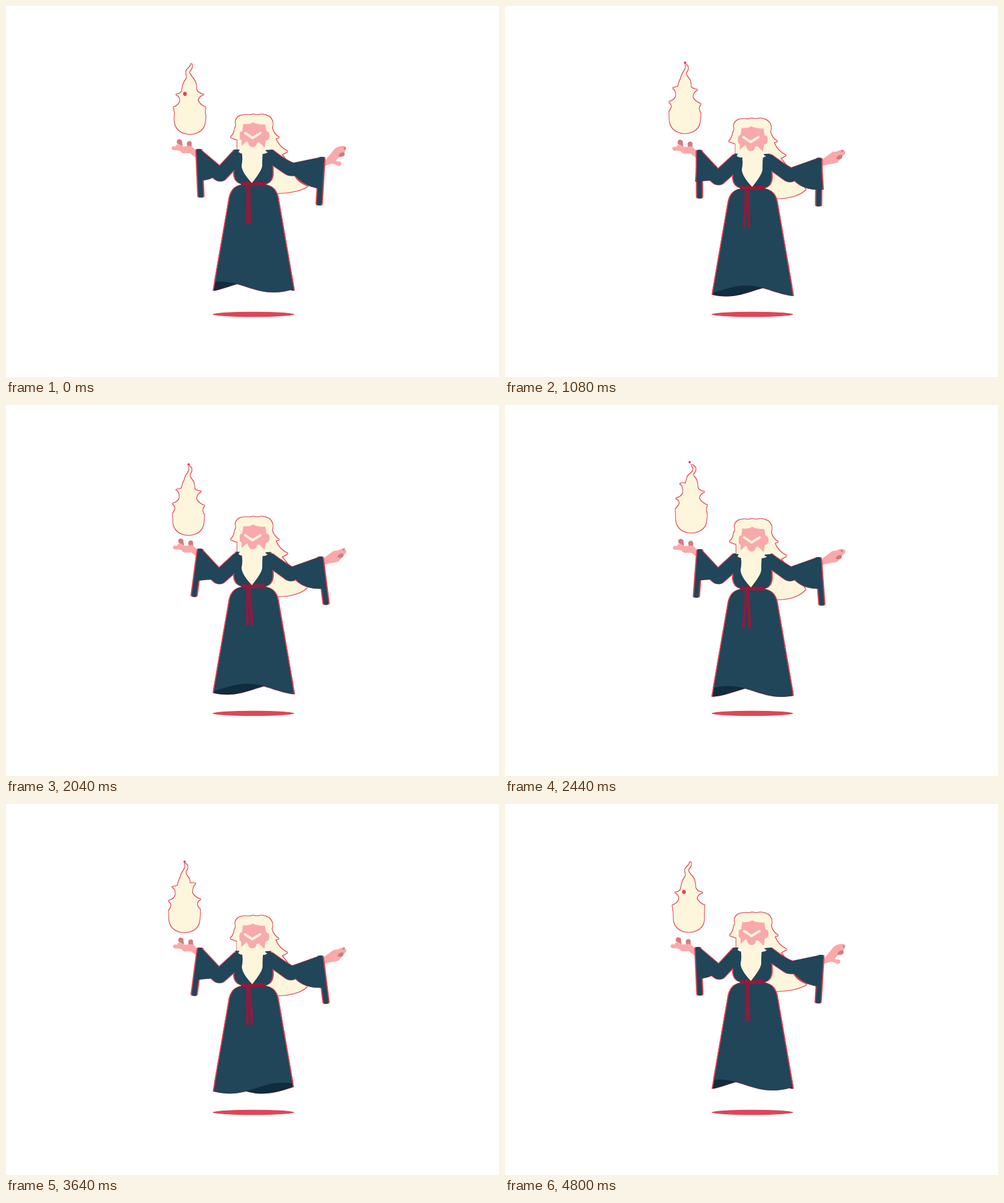
Recreate the animation shown at these times as an HTML page without scripts. Size 810 by 610 pixels, loop 4.84 s.

```html
<!DOCTYPE html>
<html lang="en">
<head>
<meta charset="utf-8">
<title>Floating wizard</title>
<style>
  html, body { margin: 0; width: 100%; height: 100%; overflow: hidden; background: #fff; }
  svg { display: block; width: 810px; height: 610px; }
  .cream { fill: #fef6dc; }
  .robe { fill: #214559; }
  .lining { fill: #102c3d; }
  .skin { fill: #faa9aa; }
  .shade { fill: #d27c7e; }
  .red { fill: #de4656; }
  .belt { fill: #96193b; }
  .brow { fill: none; stroke: #fef6dc; stroke-width: 4; stroke-linecap: round; stroke-linejoin: round; }
  .tie { stroke: #861f3f; stroke-width: 5; }
</style>
</head>
<body>
<svg viewBox="0 0 810 610">
  <!-- Master clock: every cycle restarts with it. -->
  <animate id="loop" attributeName="visibility" values="visible" begin="0s;loop.end" dur="4.84s"/>
  <defs>
    <filter id="rim" filterUnits="userSpaceOnUse" x="-60" y="-150" width="870" height="760" color-interpolation-filters="sRGB">
      <feMorphology in="SourceAlpha" operator="dilate" radius="1" result="grown"/>
      <feFlood flood-color="#de4656"/>
      <feComposite in2="grown" operator="in"/>
      <feMerge><feMergeNode/><feMergeNode in="SourceGraphic"/></feMerge>
    </filter>
    <!-- Sideways only, so the hem stays clean. -->
    <filter id="sideRim" filterUnits="userSpaceOnUse" x="0" y="0" width="810" height="610" color-interpolation-filters="sRGB">
      <feMorphology in="SourceAlpha" operator="dilate" radius="2 0" result="grown"/>
      <feFlood flood-color="#de4656"/>
      <feComposite in2="grown" operator="in"/>
      <feMerge><feMergeNode/><feMergeNode in="SourceGraphic"/></feMerge>
    </filter>
    <clipPath id="skirt">
      <path d="M387 294Q372 297 368 314L340.5 473H473.500L446 314Q442 297 427 294Z"/>
    </clipPath>
    <!-- Hem: three sine waves, 175 wide. -->
    <path id="wave" d="M2 453c32 0 55.5 18 87.5 18s55.5-18 87.5-18s55.5 18 87.5 18s55.5-18 87.5-18s55.5 18 87.5 18s55.5-18 87.5-18V280H2Z"/>
  </defs>

  <ellipse class="red" cx="406.5" cy="507" rx="67" ry="4.2"/>

  <!-- Hair -->
  <g filter="url(#rim)">
    <g class="cream">
      <animateTransform attributeName="transform" type="translate" values="0 0;0 9;0 0" begin="0s;loop.end" dur="1.6s" repeatCount="3" fill="freeze" calcMode="spline" keyTimes="0;.5;1" keySplines=".37 0 .63 1;.37 0 .63 1"/>
      <path>
        <animate attributeName="d" values="M425 225L452 243L495 297Q478 307 444 308L425 290Z;M425 225L452 243L494 294Q478 312 443 311L425 290Z;M425 225L452 243L495 297Q478 307 444 308L425 290Z" begin="0s;loop.end" dur="1.6s" repeatCount="3" fill="freeze"/>
      </path>
      <path d="M377 190Q380 178 396 179Q402 180 406 178Q412 180 420 178Q434 179 438 190Q439 196 437 200Q440 212 449 216L443 218Q449 233 463 239L452 245H380V220L369 216Q375 211 376 201Q379 198 377 190Z">
        <animateTransform attributeName="transform" type="translate" values="0 0;-2.5 0;0 0;0 0;-1 0;0 0" keyTimes="0;.117;.342;.658;.858;1" begin="0s;loop.end" dur="4.8s" fill="freeze"/>
      </path>
    </g>
  </g>

  <!-- Left hand -->
  <g>
    <animateTransform attributeName="transform" type="translate" values="0 0;4 1;0 0" begin="0s;loop.end" dur="1.6s" repeatCount="3" fill="freeze" calcMode="spline" keyTimes="0;.5;1" keySplines=".37 0 .63 1;.37 0 .63 1"/>
    <path class="shade" d="M284 233L286 228Q279 227 281 221Q284 217 289 221L290 231ZM298 231Q295 223 301 222Q306 222 305 228L306 235Z"/>
    <path class="skin" d="M318 250L313 238L304 230L291 231L286 228Q279 226 279 231Q272 229 272 234Q273 238 279 237L286 238Q289 243 294 242H302L313 250Z"/>
  </g>

  <!-- Right hand -->
  <path class="skin">
    <animate attributeName="d" values="M520 264L526 252L539 236Q545 229 557 230L559 235Q556 241 553 247Q545 248 542 255L550 256Q553 262 547 263L536 259Z;M516 264L523 251L538 240L546 239Q552 234 559 239L559 243Q555 246 552 250Q551 253 548 255L547 257Q543 259 540 259L534 260Z;M520 264L526 252L539 236Q545 229 557 230L559 235Q556 241 553 247Q545 248 542 255L550 256Q553 262 547 263L536 259Z" begin="0s;loop.end" dur="1.6s" repeatCount="3" fill="freeze" calcMode="spline" keyTimes="0;.5;1" keySplines=".37 0 .63 1;.37 0 .63 1"/>
  </path>
  <path class="shade" d="M546 247Q549 239 556 241Q558 247 551 248ZM554 233L559 232L557 237Z">
    <animateTransform attributeName="transform" type="translate" values="0 0;-3 6;0 0" begin="0s;loop.end" dur="1.6s" repeatCount="3" fill="freeze" calcMode="spline" keyTimes="0;.5;1" keySplines=".37 0 .63 1;.37 0 .63 1"/>
  </path>

  <path class="red" d="M472 276Q478 291 497 297L498 285Z">
    <animate attributeName="opacity" values="1;0;1" keyTimes="0;.02;.9" calcMode="discrete" begin="0s;loop.end" dur="1.6s" repeatCount="3" fill="freeze"/>
  </path>

  <!-- Robe -->
  <g class="robe" filter="url(#sideRim)">
    <path>
      <animate attributeName="d" values="M384 236H376L351 263L319 236L314 240L323 287Q332 286 340 282Q352 294 361 284L378 266Z;M384 245L376 244L350 268L322 238L317 242L314 289Q330 287 338 287Q350 301 361 289L378 274Z;M384 236H376L351 263L319 236L314 240L323 287Q332 286 340 282Q352 294 361 284L378 266Z" begin="0s;loop.end" dur="1.6s" repeatCount="3" fill="freeze" calcMode="spline" keyTimes="0;.5;1" keySplines=".37 0 .63 1;.37 0 .63 1"/>
    </path>
    <path>
      <animate attributeName="d" values="M428 236H437Q460 254 472 258L521 248L523 253L514 300Q490 296 475 279Q466 281 459 276L434 259Z;M428 245L437 244Q460 261 470 266L515 250L519 254L522 302Q492 304 476 287Q468 293 459 286L434 268Z;M428 236H437Q460 254 472 258L521 248L523 253L514 300Q490 296 475 279Q466 281 459 276L434 259Z" begin="0s;loop.end" dur="1.6s" repeatCount="3" fill="freeze" calcMode="spline" keyTimes="0;.5;1" keySplines=".37 0 .63 1;.37 0 .63 1"/>
    </path>

    <!-- Cuffs -->
    <g>
      <animateTransform attributeName="transform" type="translate" values="317 239;320 241;317 239" begin="0s;loop.end" dur="1.6s" repeatCount="3" fill="freeze" calcMode="spline" keyTimes="0;.5;1" keySplines=".37 0 .63 1;.37 0 .63 1"/>
      <rect x="-4" y="-4" width="8" height="80" rx="3">
        <animateTransform attributeName="transform" type="rotate" values="-2.5;3;9.5;3.7;-4.5;-2.5" keyTimes="0;.15;.33;.55;.8;1" begin="0s;loop.end" dur="1.6s" repeatCount="3" fill="freeze"/>
      </rect>
    </g>
    <g>
      <animateTransform attributeName="transform" type="translate" values="519 252;515 254;519 252" begin="0s;loop.end" dur="1.6s" repeatCount="3" fill="freeze" calcMode="spline" keyTimes="0;.5;1" keySplines=".37 0 .63 1;.37 0 .63 1"/>
      <rect x="-4" y="-4" width="8" height="80" rx="3">
        <animateTransform attributeName="transform" type="rotate" values="3.5;-3;-9;-3.7;5;3.5" keyTimes="0;.15;.33;.55;.8;1" begin="0s;loop.end" dur="1.6s" repeatCount="3" fill="freeze"/>
      </rect>
    </g>

    <!-- Torso and skirt -->
    <g>
      <animateTransform attributeName="transform" type="translate" values="0 0;0 9;0 0" begin="0s;loop.end" dur="1.6s" repeatCount="3" fill="freeze" calcMode="spline" keyTimes="0;.5;1" keySplines=".37 0 .63 1;.37 0 .63 1"/>
      <path d="M378 236H434Q438 250 438 276Q437 290 426 293H388Q376 290 375 276Q375 255 378 236Z"/>
      <g clip-path="url(#skirt)">
        <g>
          <animateTransform attributeName="transform" type="translate" values="0 0;175 0" begin="0s;loop.end" dur=".48s" repeatCount="10" fill="freeze"/>
          <use href="#wave" x="55" class="lining"/>
          <use href="#wave"/>
        </g>
      </g>
    </g>
  </g>

  <!-- Belt, beard and face -->
  <g>
    <animateTransform attributeName="transform" type="translate" values="0 0;0 9;0 0" begin="0s;loop.end" dur="1.6s" repeatCount="3" fill="freeze" calcMode="spline" keyTimes="0;.5;1" keySplines=".37 0 .63 1;.37 0 .63 1"/>
    <line class="tie" x1="397" y1="293" y2="358">
      <animate attributeName="x2" values="396.5;396;391.5;394;396.5" keyTimes="0;.35;.55;.8;1" begin="0s;loop.end" dur="1.6s" repeatCount="3" fill="freeze"/>
    </line>
    <line class="tie" x1="399" y1="293" y2="358">
      <animate attributeName="x2" values="400.5;406;401.5;400;400.5" keyTimes="0;.35;.55;.8;1" begin="0s;loop.end" dur="1.6s" repeatCount="3" fill="freeze"/>
    </line>
    <rect class="belt" x="386" y="289.5" width="41" height="6.5" rx="1"/>
    <path class="cream" d="M386 232H423Q421 243 421 262Q421 270 404 291Q387 273 387 262Q390 250 386 232Z">
      <animateTransform attributeName="transform" type="translate" values="0 0;4 0;0 0;0 0;1 0;0 0" keyTimes="0;.117;.342;.658;.858;1" begin="0s;loop.end" dur="4.8s" fill="freeze"/>
    </path>
    <g>
      <animateTransform attributeName="transform" type="translate" values="0 0;-2.5 0;0 0;0 0;-1 0;0 0" keyTimes="0;.117;.342;.658;.858;1" begin="0s;loop.end" dur="4.8s" fill="freeze"/>
      <path class="cream" d="M380 215H437V236L426 237Q428 241 431 240Q424 245 418 242H392Q387 244 382 240L384 236H380Z"/>
      <path class="skin" d="M390 194Q401 195 406 191Q412 195 426 195L428 206Q433 206 433 213Q433 221 427 221L425 233L416 224L412 225Q412 232 405 232Q399 232 398 225L396 222L387 230V221Q383 219 384 212Q384 205 388 206Z"/>
      <path class="brow" d="M393 209L405 217L418 209"/>
    </g>
  </g>

  <!-- Flame: left side, right side and tail cycle at their own pace. -->
  <g>
    <animateTransform attributeName="transform" type="translate" values="302 0;301 0;296 0;293 0;295 0;299 0;306 0;301 0;296 0;293 0;293 0;301 0;302 0" keyTimes="0;.117;.208;.292;.342;.417;.508;.583;.658;.708;.771;.858;1" begin="0s;loop.end" dur="4.8s" fill="freeze"/>
    <g>
      <animateTransform attributeName="transform" type="translate" values="0 210.5;0 206.5;0 210.5;0 214.5;0 210.5" calcMode="spline" keyTimes="0;.25;.5;.75;1" keySplines=".36 .55 .64 1;.36 0 .64 .45;.36 .55 .64 1;.36 0 .64 .45" begin="0s;loop.end" dur="2.4s" repeatCount="2" fill="freeze"/>
      <g class="cream" filter="url(#rim)">
        <path>
          <animate attributeName="d" values="M1 0C-14 0 -23 -8 -25 -20Q-26 -26 -25 -30Q-25 -33 -25 -36Q-25 -40 -27 -44Q-17 -47 -16 -55Q-16 -63 -23 -65Q-13 -66 -13 -72Q-12 -80 -9 -86Q-6 -90 -5 -92L1 -92Z;M1 0C-14 0 -23 -8 -25 -20Q-25 -34 -26 -41Q-20 -45 -18 -51Q-18 -57 -25 -59Q-14 -62 -13 -68Q-12 -82 -18 -84Q-10 -86 -9 -82Q-8 -85 -7 -88Q-6 -90 -5 -92L1 -92Z;M1 0C-14 0 -23 -8 -25 -20Q-25 -36 -27 -44Q-17 -47 -16 -55Q-16 -63 -23 -65Q-13 -66 -13 -72Q-12 -80 -9 -86Q-8 -88 -7 -89Q-6 -90 -6 -91Q-5 -92 -5 -92L1 -92Z" keyTimes="0;.75;1" begin="0s;loop.end" dur=".32s" repeatCount="15" fill="freeze"/>
        </path>
        <path>
          <animate attributeName="d" values="M-1 0C14 0 24 -8 25 -20Q26 -26 26 -30Q25 -33 25 -36Q25 -40 26 -44Q17 -47 13 -55Q14 -63 23 -65Q12 -67 11 -73Q11 -80 9 -86Q7 -89 5 -92L-1 -92Z;M-1 0C14 0 24 -8 25 -20Q26 -28 26 -37Q22 -41 21 -45Q21 -52 27 -54Q15 -58 13 -65Q13 -77 19 -80Q10 -82 9 -80Q9 -85 8 -88Q6 -90 5 -92L-1 -92Z;M-1 0C14 0 24 -8 25 -20Q25 -36 26 -44Q17 -47 13 -55Q14 -63 23 -65Q12 -67 11 -73Q11 -80 9 -86Q8 -88 7 -89Q6 -90 6 -91Q5 -92 5 -92L-1 -92Z" keyTimes="0;.58;1" begin="0s;loop.end" dur=".48s" repeatCount="10" fill="freeze"/>
        </path>
        <path>
          <animate attributeName="d" values="M-7 -87C-2 -97 -9 -100 -5 -105C-2 -109 1 -110 2 -116C6 -111 3 -108 0 -104C-3 -100 2 -97 8 -87Z;M-7 -87C-8 -95 0 -96 3 -102C5 -106 2 -108 0 -112C6 -110 9 -106 7 -102C4 -97 1 -97 8 -87Z;M-7 -87C-2 -97 -9 -100 -5 -105C-2 -109 1 -110 2 -116C6 -111 3 -108 0 -104C-3 -100 2 -97 8 -87Z" keyTimes="0;.65;1" begin="0s;loop.end" dur=".32s" repeatCount="15" fill="freeze"/>
        </path>
      </g>

      <!-- Loose sparks and gaps -->
      <g class="red">
        <circle cy="-116" r="2">
          <animate attributeName="cx" values="5;-7" begin="0s;loop.end" dur=".32s" repeatCount="15" fill="freeze"/>
          <animate attributeName="opacity" values="0;1;0" keyTimes="0;.1;.7" calcMode="discrete" begin="0s;loop.end" dur=".32s" repeatCount="15" fill="freeze"/>
        </circle>
        <ellipse cx="-17" cy="-87" rx="2" ry="1.3" opacity="0">
          <animate attributeName="opacity" values="0;1" keyTimes="0;.8" calcMode="discrete" begin="0s;loop.end" dur=".32s" repeatCount="15"/>
        </ellipse>
        <ellipse cx="-8" cy="-66" rx="3" ry="3.5">
          <animate attributeName="cy" values="-66;-89" begin="0s;loop.end" dur=".32s" repeatCount="15"/>
          <animate attributeName="opacity" values="1;0" keyTimes="0;.25" calcMode="discrete" begin="0s;loop.end" dur=".32s" repeatCount="15"/>
        </ellipse>
        <circle cx="10" cy="-75" r="3.3" opacity="0">
          <animate attributeName="cy" values="-66;-88" begin="0s;loop.end" dur=".48s" repeatCount="10"/>
          <animate attributeName="opacity" values="0;1;0" keyTimes="0;.3;.5" calcMode="discrete" begin="0s;loop.end" dur=".48s" repeatCount="10"/>
        </circle>
      </g>
    </g>
  </g>
</svg>
</body>
</html>
```
